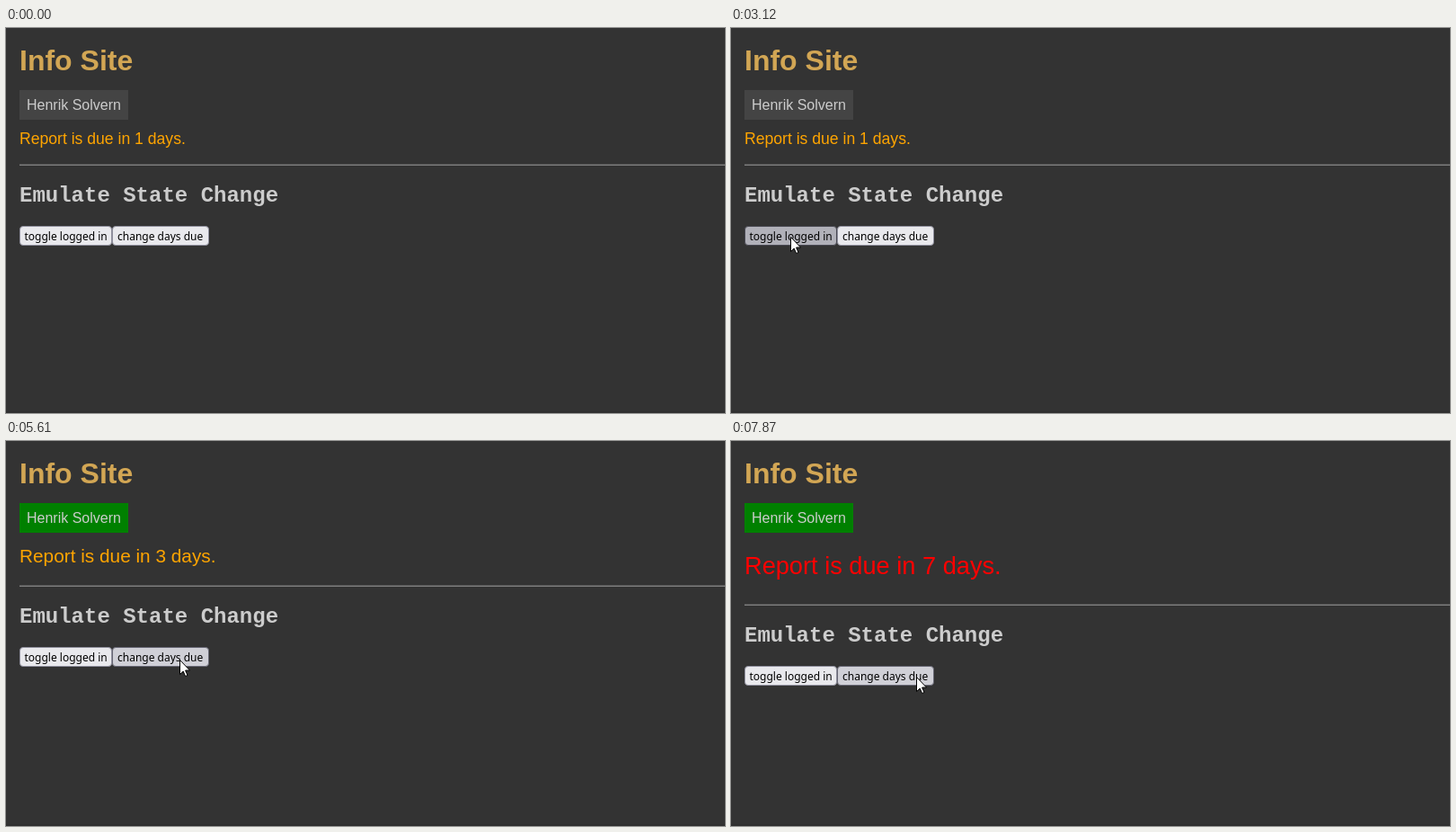
An HTML page that plays this animation: 800x428 px, repeating every 8000 ms.

```html
<!DOCTYPE html>
<html lang="en">
<head>
<meta charset="utf-8">
<title>Info Site</title>
<style>
  html, body { margin: 0; width: 100%; height: 100%; overflow: hidden; background: #333; }
  svg { display: block; }
  text { font: 16px Arial, "Liberation Sans", sans-serif; fill: #ccc; white-space: pre; }
  .title { font-size: 32px; font-weight: bold; fill: #d2a654; }
  .section { font: bold 24px "Courier New", "Liberation Mono", monospace; }
  .button rect { fill: #e9e9ed; stroke: #8f8f9d; }
  .button text { font: 12px "Noto Sans", sans-serif; fill: #000; }
  .button.hover rect { fill: #d0d0d7; stroke: #676774; }
  .button.active rect { fill: #b1b1b9; stroke: #484851; }
</style>
</head>
<body>
<svg width="800" height="428" viewBox="0 0 800 428">
  <rect width="800" height="428" fill="#333"/>
  <rect y="426" width="800" height="2" fill="#2f2f2f"/>
  <text class="title" x="15" y="47">Info Site</text>
  <rect id="badge" x="15" y="69" width="121" height="33"/>
  <text x="23" y="91">Henrik Solvern</text>
  <text id="report" x="15"></text>
  <g id="lower">
    <rect x="15" y="151" width="785" height="1" fill="#555"/>
    <rect x="15" y="152" width="785" height="1" fill="#808080"/>
    <text class="section" x="15" y="193">Emulate State Change</text>
    <g class="button">
      <rect x="15.5" y="220.5" width="102" height="21" rx="3.5"/>
      <text x="20.5" y="236">toggle logged in</text>
    </g>
    <g class="button">
      <rect x="118.5" y="220.5" width="107" height="21" rx="3.5"/>
      <text x="124" y="236">change days due</text>
    </g>
  </g>
  <path id="cursor" d="M.5 .5V16.5L4.2 13 6.6 18.5 9 17.5 6.6 12H11.5Z"
        fill="#fff" stroke="#000" stroke-linejoin="round"/>
</svg>
<script>
const LOOP = 8000, HOLD = 130, HOP = 140;
const $ = id => document.getElementById(id);
const buttons = [...document.querySelectorAll(".button")];

const loginToggles = [1720, 2440, 3270];
const presses = [3140 - HOLD / 6.5, 4400, 5040, 5620, 6180, 6600, 7430];
const [, ...dayPresses] = presses;

// Pointer moves, resting in between
const glides = [
  { from: 620, to: 1580, x: 66, y: 232 },
  { from: 3560, to: 4000, x: 170, y: 230 },
  { from: 4500, to: 4760, x: 183, y: 235 },
  { from: 5190, to: 5910, x: 198, y: 248 },
  { from: 6310, to: 7150, x: 205, y: 254 },
  { from: 7580, to: 7870, x: 206, y: 262 }
];

const easeOut = p => 1 - (1 - p) ** 2;
const countPassed = (times, t) => times.filter(time => time <= t).length;

function pointerAt(t) {
  let x = 207, y = 393;
  for (const glide of glides) {
    if (t < glide.from) break;
    const span = glide.to - glide.from, hops = Math.round(span / HOP);
    const p = easeOut(Math.min(1, Math.floor((t - glide.from) / span * hops) / hops));
    x += (glide.x - x) * p;
    y += (glide.y - y) * p;
  }
  return [Math.round(x), Math.round(y)];
}

function render(t) {
  const [x, y] = pointerAt(t);
  const held = presses.some(press => t >= press && t < press + HOLD);
  const days = 1 + countPassed(dayPresses, t - HOLD);
  const loggedIn = countPassed(loginToggles, t) % 2;

  // The report grows with the days and pushes the lower part down
  const size = 16 + 1.6 * days;
  const ascent = Math.round(.905 * size), descent = Math.round(.212 * size);
  const shift = Math.round(2 * size + ascent + descent - 55.2);

  $("badge").setAttribute("fill", loggedIn ? "#008000" : "#444");
  $("report").textContent = `Report is due in ${days} days.`;
  $("report").style.fontSize = size + "px";
  $("report").style.fill = days < 5 ? "#ffa500" : "#f00";
  $("report").setAttribute("y", Math.round(95.4 + size + ascent));
  $("lower").setAttribute("transform", `translate(0 ${shift})`);
  $("cursor").setAttribute("transform", `translate(${x} ${y})`);
  $("cursor").setAttribute("visibility", t < glides[0].from ? "hidden" : "visible");

  const inRow = y >= 220 + shift && y < 242 + shift;
  buttons.forEach((button, i) => {
    const box = button.firstElementChild.getBBox();
    const over = inRow && x >= box.x && x <= box.x + box.width;
    button.classList.toggle("hover", over);
    button.classList.toggle("active", over && held);
  });
}

const start = performance.now();
function tick() {
  render((performance.now() - start) % LOOP);
  requestAnimationFrame(tick);
}
tick();
</script>
</body>
</html>
```
